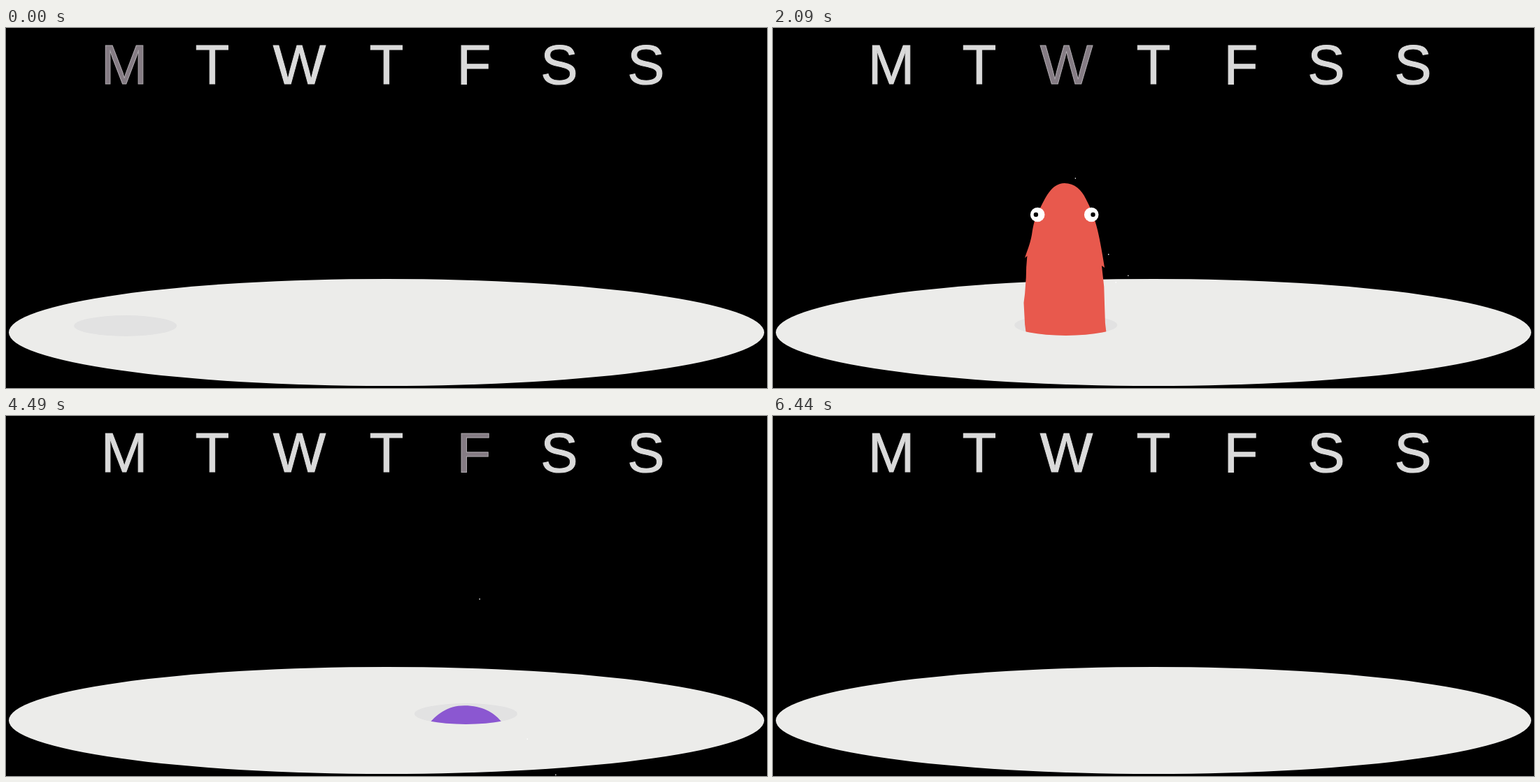
An HTML page with a canvas for the animation above (6510 ms loop, 1088x515 px).

```html
<!DOCTYPE html>
<html lang="en">
<head>
<meta charset="utf-8">
<title>Week</title>
<style>
  html, body { margin: 0; width: 100%; height: 100%; overflow: hidden; background: #000; }
  canvas { display: block; }
</style>
</head>
<body>
<canvas id="stage" width="1088" height="515"></canvas>
<script>
const ctx = document.getElementById('stage').getContext('2d');
const LOOP = 6510, DAY = 940, GONE = 800;

// letter, letter x, hole x, hole y, colour
const days = [
  ['M', 169, 170.7, 426, '#3f8fe0'],
  ['T', 295, 290.7, 426, '#ffde33'],
  ['W', 419.5, 418.7, 425, '#e8594d'],
  ['T', 544, 545, 424, '#2b9f76'],
  ['F', 669, 657.5, 426, '#8b57d1'],
  ['S', 791, 785, 426, '#3f8fe0'],
  ['S', 915, 912, 426, '#ffde33']
];

// origin at the top of the head
const body = new Path2D(
  'M0 0C-23 0 -34 22 -43 37C-52 50 -54 58 -57 74C-60 88 -66 98 -69 107L-65 104' +
  'Q-67 120 -67 135L-69 158L-71 171L-69 202L-65 227L-63 215Q-40 236 -4 238' +
  'L-1 248L3 239Q24 238 47 232L59 224L67 217L70 227L73 214L71 200L70 175L69 148' +
  'L65 118L70 121C66 100 62 82 58 68C52 48 46 36 37 22C30 10 18 0 0 0Z');

// x and height at 450 ms, vertical speed at that moment
const specks = [[111, -112, .236], [76, -152, .196], [89, -87, .3], [17, -303, .02]];

const width = [[0, 1.3], [70, 1.08], [210, .82], [450, 1], [600, 1.12], [730, 1.4], [800, 1.5]];
const eyeGap = [[0, 48], [70, 46], [210, 38.5], [450, 40.5], [730, 50], [800, 50]];
const eyeDrop = [[0, 34], [70, 36.5], [210, 45], [450, 40], [730, 34], [800, 34]];

function at(keys, t) {
  let i = 1;
  while (i < keys.length - 1 && t > keys[i][0]) i++;
  const [t0, a] = keys[i - 1], [t1, b] = keys[i];
  return a + (b - a) * (t - t0) / (t1 - t0);
}

// the jump: height of the head relative to the hole
function headY(t) {
  const a = t - 70, b = t - 210, c = t - 450;
  return -75 - .9143 * a + a * b * (.001826 + 4.15e-7 * c);
}

// animation advances in steps of 70 ms, with one longer hold before 450 ms
function step(t) {
  return t < 450 ? Math.min(350, Math.floor(t / 70) * 70) : 450 + Math.floor((t - 450) / 70) * 70;
}

function oval(x, y, rx, ry, fill) {
  ctx.fillStyle = fill;
  ctx.beginPath();
  ctx.ellipse(x, y, rx, ry, 0, 0, 7);
  ctx.fill();
}

function drawLetter(letter, x, active) {
  ctx.fillStyle = active ? '#857c84' : '#dadada';
  ctx.strokeStyle = active ? '#b0abb0' : '#dadada';
  ctx.fillText(letter, x, 79.6);
  ctx.strokeText(letter, x, 79.6);
}

function drawCreature(color, t) {
  const y = headY(t), gap = at(eyeGap, t), drop = y + at(eyeDrop, t);
  ctx.save();
  // keep only what is above the front rim of the hole
  ctx.beginPath();
  ctx.moveTo(-200, -500);
  ctx.lineTo(-200, 0);
  ctx.ellipse(0, 0, 73.5, 15, 0, Math.PI, 0, true);
  ctx.lineTo(200, 0);
  ctx.lineTo(200, -500);
  ctx.clip();
  ctx.translate(-2, 0);
  ctx.save();
  ctx.translate(0, y);
  ctx.scale(at(width, t), 1);
  ctx.fillStyle = color;
  ctx.fill(body);
  ctx.restore();
  for (const side of [-1, 1]) {
    oval(side * gap, drop, 10.3, 10.3, '#fff');
    oval(side * (gap + 2.3), drop, 3.2, 3.2, '#000');
  }
  ctx.restore();
}

function drawSpecks(t) {
  const d = t - 450;
  for (const [x, y, v] of specks)
    oval(x * (1 + .0007 * d - 5e-7 * d * d), y + v * d + .0017 * d * d, .8, .8, '#fff');
}

function frame(now) {
  const time = now % LOOP, today = Math.floor(time / DAY), t = step(time % DAY);
  const open = t < GONE;
  ctx.fillStyle = '#000';
  ctx.fillRect(0, 0, 1088, 515);
  ctx.font = '80px "Liberation Sans", Arial, sans-serif';
  ctx.textAlign = 'center';
  ctx.lineJoin = 'miter';
  ctx.miterLimit = 3;
  days.forEach(([letter, x], i) => drawLetter(letter, x, open && i === today));
  oval(544, 435.5, 540, 76.5, '#ececea');
  if (open) {
    const [, , x, y, color] = days[today];
    ctx.save();
    ctx.translate(x, y);
    oval(0, 0, 73.5, 15, '#e2e2e2');
    if (t > 140) drawSpecks(t);
    if (t > 0) drawCreature(color, t);
    ctx.restore();
  }
  requestAnimationFrame(loop);
}

function loop() { frame(performance.now()); }
frame(0);
</script>
</body>
</html>
```
